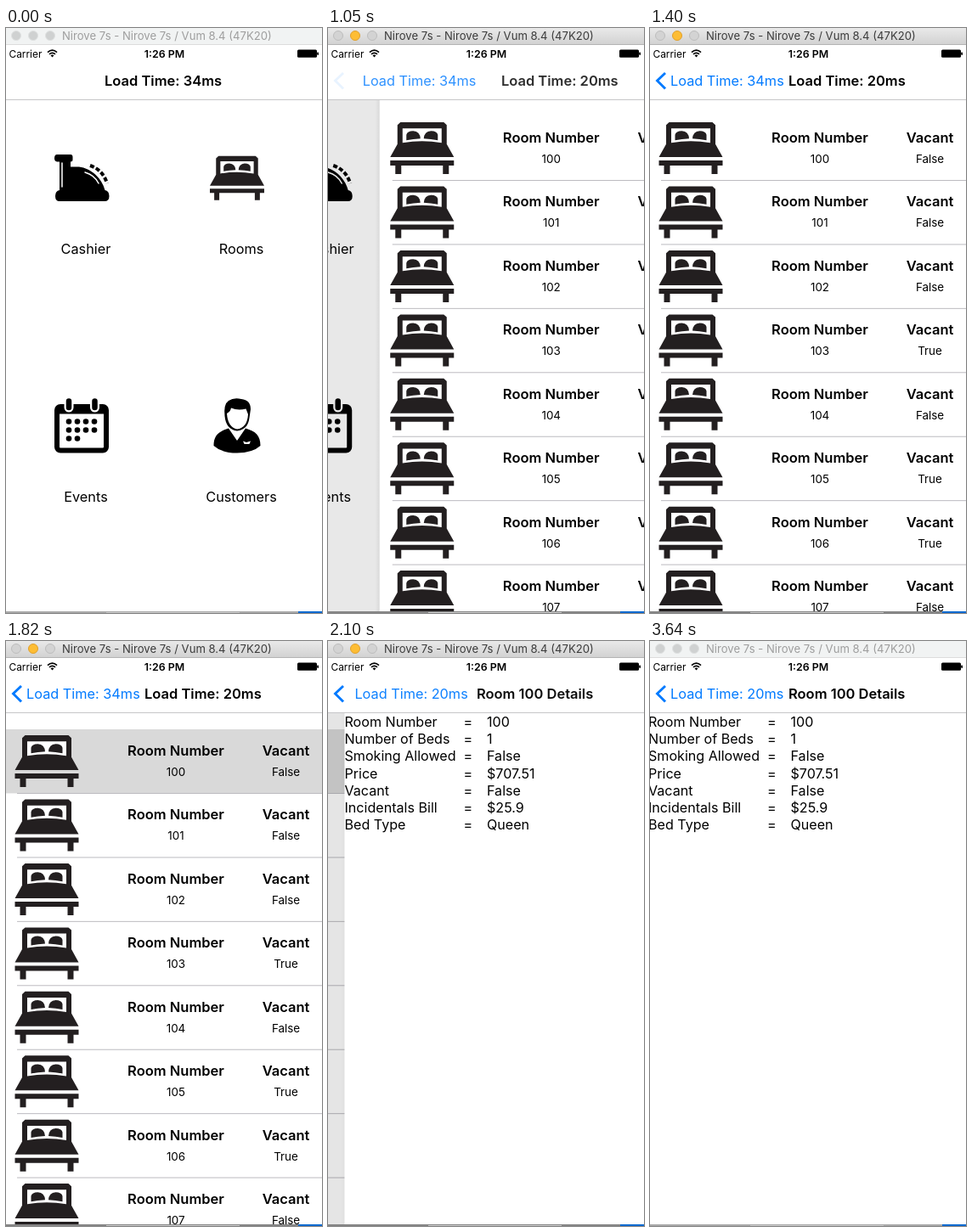
An HTML page that plays this animation: 372x689 px, repeating every 3710 ms.

```html
<!DOCTYPE html>
<html lang="en">
<head>
<meta charset="utf-8">
<title>Hotel app</title>
<style>
  html, body { margin: 0; width: 100%; height: 100%; overflow: hidden; background: #fff; }
  svg { display: block; width: 372px; height: 689px; }
  text { font: 16.3px Inter, "Open Sans", sans-serif; white-space: pre; }
  .bold { font-size: 16.5px; font-weight: 600; }
  .mid { text-anchor: middle; }
  .small { font-size: 13.4px; }
  .status { font-size: 11.9px; }
  .clock { font-size: 12.4px; }
  .detail { font-size: 16.1px; }
  .link { fill: #007aff; }
  .caption { font-size: 13.1px; fill: #9e9e9e; }
  .focus .caption { fill: #3c3c3c; }
  .on, .focus .off { display: none; }
  .focus .on { display: inline; }
</style>
</head>
<body>
<svg id="stage" viewBox="0 0 372 689">
  <defs>
    <linearGradient id="bar" x2="0" y2="1">
      <stop stop-color="#e9e9e9"/><stop offset="1" stop-color="#d1d1d1"/>
    </linearGradient>
    <linearGradient id="fade">
      <stop stop-opacity="0"/><stop offset="1" stop-opacity=".1"/>
    </linearGradient>
    <g id="bed" fill="#231f20">
      <path d="M12 .3H63L66.5 3.5V26L75 41.3H0L8.5 26V3.5Z"/>
      <path fill="#fff" d="M14.5 7.5H60.5V24.5Q37.5 20.5 14.5 24.5Z"/>
      <path d="M19 20.5V15Q20 10.5 27 10.5Q35 11 35.5 19.5Q27 19.8 19 21.5ZM56 20.5V15Q55 10.5 48 10.5Q40 11 39.5 19.5Q48 19.8 56 21.5Z"/>
      <path d="M0 45.3H75V51.3H69V61.3H62V51.3H13V61.3H6V51.3H0Z"/>
    </g>
  </defs>
  <rect width="372" height="689" fill="#fff"/>

  <g id="home">
    <rect y="85" width="372" height="604" fill="#fff"/>
    <g id="bell">
      <path d="M60 149H76Q78.500 149 78.500 152V155Q78.500 157.500 76 157.500V163.500H86C100 165 113 177 116.500 191Q121.500 192 121.500 198Q121.500 204 116 204H63Q58 204 58 198Q58 192 63 191V157.500H60Q57 157 57 153.500Q57 149 60 149Z"/>
      <g fill="none" stroke="#fff" stroke-width="1.500" stroke-linecap="round">
        <path d="M66 159V187"/><path d="M93 170Q104 173 109 183"/>
      </g>
      <path d="M99 162Q114 167 119 183" fill="none" stroke="#000" stroke-width="4" stroke-dasharray="5 2.500"/>
    </g>
    <use href="#bed" transform="translate(240 150.500) scale(.853)"/>
    <g id="calendar">
      <rect x="60" y="446" width="58" height="51.500" rx="4" fill="none" stroke="#000" stroke-width="6"/>
      <path d="M60 446H118V454.500H60Z"/>
      <g stroke-linecap="round">
        <path d="M74 439.500V447M104.500 439.500V447" stroke="#fff" stroke-width="11"/>
        <path d="M74 439.500V447M104.500 439.500V447" stroke="#000" stroke-width="6.500"/>
      </g>
      <g id="dots"></g>
    </g>
    <g id="guest">
      <path d="M257.500 457Q256 443 262 439Q268 435 277 437Q288 438 288 449L286.500 459Q285 473 272 474.500Q259 473 257.500 457Z"/>
      <path fill="#fff" d="M260 454Q264 452 265 447.500Q273 451 282.500 448.500L285 455Q284 471 272 472.500Q261 470 260 454Z"/>
      <path d="M244.500 492C244.500 480 250 475 262 471.500L272 486L282 471.500C294 475 299.500 480 299.500 492Q290 500.500 272 500.500Q254 500.500 244.500 492Z"/>
      <path fill="#fff" d="M263 471.500L272 485L281 471.500L277.500 473.500L272 476L266.500 473.500ZM279 486.500L283 488L288 486.500L286.500 490H280.500Z"/>
    </g>
    <g class="mid">
      <text x="94" y="266">Cashier</text><text x="277" y="266">Rooms</text>
      <text x="94" y="558">Events</text><text x="277" y="558">Customers</text>
    </g>
    <rect class="dim" y="85" width="372" height="604"/>
  </g>

  <g id="list">
    <rect class="edge" x="-7" y="85" width="5" height="604" fill="url(#fade)"/>
    <rect x="-2" y="85" width="374" height="604" fill="#fff"/>
    <rect id="pick" y="104" width="372" height="75.400" fill="#d9d9d9"/>
    <g id="rows"></g>
    <rect class="dim" x="-2" y="85" width="374" height="604"/>
  </g>

  <g id="info">
    <rect class="edge" x="-7" y="85" width="5" height="604" fill="url(#fade)"/>
    <rect x="-2" y="85" width="374" height="604" fill="#fff"/>
    <g id="facts"></g>
  </g>

  <g id="nav">
    <rect y="19" width="372" height="66" fill="#fff"/>
    <rect y="84" width="372" height="1" fill="#c6c6c8"/>
    <path id="back" d="M18 53L8.500 62L18 71.500" fill="none" stroke="#007aff" stroke-width="2.900"/>
    <text id="title0" class="bold" y="68">Load Time: 34ms</text>
    <text id="link0" class="link" y="68">Load Time: 34ms</text>
    <text id="title1" class="bold" y="68">Load Time: 20ms</text>
    <text id="link1" class="link" y="68">Load Time: 20ms</text>
    <text id="title2" class="bold" y="68">Room 100 Details</text>
  </g>

  <g id="status">
    <text class="status" x="3.500" y="34.500">Carrier</text>
    <text class="bold clock mid" x="186.500" y="34.500">1:26 PM</text>
    <g fill="none" stroke="#000" stroke-width="1.700">
      <path d="M49 28.600Q54.500 23.800 60 28.600M51 30.800Q54.500 27.800 58 30.800"/>
    </g>
    <path d="M52.500 32.300Q54.500 30.600 56.500 32.300L54.500 34.500Z"/>
    <rect x="343" y="25.500" width="23" height="9.300" rx="1.500"/>
    <rect x="366.300" y="28.500" width="1.700" height="3.500" rx=".8"/>
  </g>

  <g id="desk">
    <rect y="687" width="372" height="2" fill="#a9a9a9"/>
    <rect class="on" y="687" width="372" height="2" fill="#858585"/>
    <rect x="118" y="688" width="157" height="1" fill="#c9c9c9"/>
    <rect x="344" y="687" width="28" height="2" fill="#0a69cf"/>
  </g>

  <g id="window">
    <rect width="372" height="20" fill="#f1f3f3"/>
    <rect class="on" width="372" height="20" fill="url(#bar)"/>
    <rect class="off" y="19" width="372" height="1" fill="#dcdcdc"/>
    <rect class="on" y="19" width="372" height="1" fill="#b4b4b4"/>
    <g class="off" fill="#cfd1d1" stroke="#dfe1e1">
      <circle cx="12" cy="9" r="5.500"/><circle cx="32" cy="9" r="5.500"/><circle cx="52" cy="9" r="5.500"/>
    </g>
    <g class="on" fill="#d3d3d3" stroke="#bdbdbd">
      <circle cx="12" cy="9" r="5.500"/>
      <circle cx="32" cy="9" r="5.500" fill="#fdbd34" stroke="#e0a02c"/>
      <circle cx="52" cy="9" r="5.500"/>
    </g>
    <text class="caption" x="66" y="14">Nirove 7s - Nirove 7s / Vum 8.4 (47K20)</text>
  </g>
</svg>

<script>
  const LOOP = 3710, STEP = 70, W = 372;
  const $ = id => document.getElementById(id);
  const text = (x, y, str, cls) => `<text x="${x}" y="${y}" class="${cls}">${str}</text>`;

  // Calendar days
  $('dots').innerHTML = Array.from({ length: 10 }, (_, i) =>
    `<circle cx="${74 + i % 4 * 10}" cy="${463.5 + Math.floor(i / 4) * 10}" r="3.3"/>`).join('');

  // Room rows
  const vacant = [0, 0, 0, 1, 0, 1, 1, 0], pitch = 75.43;
  $('rows').innerHTML = vacant.map((free, i) => `<g transform="translate(0 ${i * pitch})">
    <use href="#bed" x="10.5" y="110.8"/>
    ${text(200, 135, 'Room Number', 'bold mid')}${text(200, 159, 100 + i, 'small mid')}
    ${text(329.5, 135, 'Vacant', 'bold mid')}${text(329.5, 159, free ? 'True' : 'False', 'small mid')}
    <rect x="13" y="179" width="359" height="1" fill="#bcbbc0"/></g>`).join('');

  // Room details
  const facts = {
    'Room Number': '100', 'Number of Beds': '1', 'Smoking Allowed': 'False', 'Price': '$707.51',
    'Vacant': 'False', 'Incidentals Bill': '$25.9', 'Bed Type': 'Queen'
  };
  $('facts').innerHTML = Object.entries(facts).map(([name, value], i) => {
    const y = 101 + i * 20.2;
    return text(-2, y, name, 'detail') + text(138, y, '=', 'detail') + text(165.5, y, value, 'detail');
  }).join('');

  // Share of a push still to travel, critically damped
  function rest(ms) {
    if (ms < 30) return 1;
    if (ms >= 560) return 0;
    const x = ms * 0.01533;
    return (1 + x) * Math.exp(-x);
  }
  const clamp = v => Math.min(1, Math.max(0, v));
  const navRest = r => clamp((r - 0.012) * 1.16);
  const fadeOut = n => clamp(n * 1.6 - 0.6);

  function slide(id, x) {
    $(id).style.display = x < W ? '' : 'none';
    $(id).setAttribute('transform', `translate(${x.toFixed(2)} 0)`);
  }
  function label(id, x, alpha) {
    $(id).setAttribute('x', x.toFixed(2));
    $(id).setAttribute('opacity', alpha.toFixed(3));
  }
  // Dim the page below and fade the shadow of the page on top
  function shade(below, above, r) {
    $(below).querySelector('.dim').setAttribute('opacity', 0.11 * (1 - r));
    $(above).querySelector('.edge').setAttribute('opacity', clamp(r * 4));
  }

  function draw(t) {
    const a = rest(t - 840), b = rest(t - 1802);
    const m = navRest(a), n = navRest(b);

    $('stage').classList.toggle('focus', t >= 630 && t < 3640);
    $('pick').style.display = t >= 1820 ? '' : 'none';

    slide('home', -0.3 * W * (1 - a));
    slide('list', W * a - 0.3 * W * (1 - b));
    slide('info', W * b);
    shade('home', 'list', a);
    shade('list', 'info', b);

    label('title0', 24 + 92 * m, fadeOut(m));
    label('link0', 24 + 92 * m - 80 * (1 - n), (1 - m) * fadeOut(n));
    label('title1', 163 + 225 * m - 139 * (1 - n), (1 - m) * fadeOut(n));
    label('link1', 24 + 139 * n, 1 - n);
    label('title2', 163 + 225 * n, 1 - n);
    $('back').setAttribute('opacity', clamp(1 - m * 5));
  }

  const start = performance.now();
  function tick() {
    const t = (performance.now() - start) % LOOP;
    draw(Math.floor(t / STEP) * STEP);
    requestAnimationFrame(tick);
  }
  tick();
</script>
</body>
</html>
```
